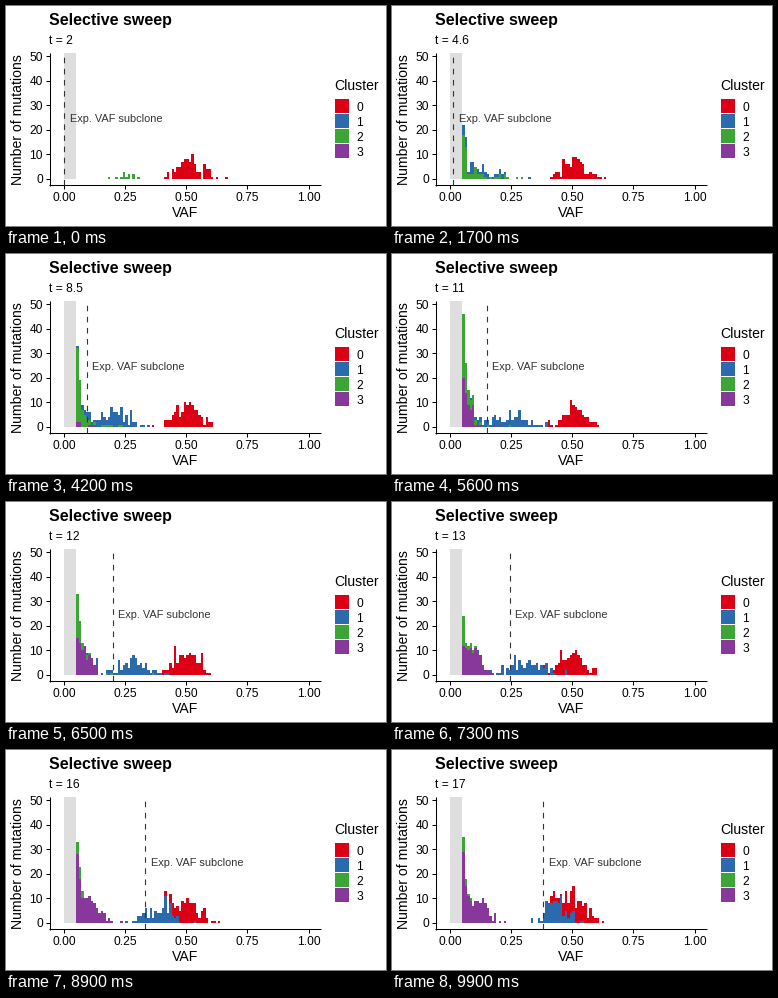
A matplotlib script that plays this animation: 380x220 px, repeating every 10 s.

```python
import numpy as np
import matplotlib.pyplot as plt
from matplotlib.animation import FuncAnimation
from matplotlib.patches import Rectangle

W, H, DPI = 380, 220, 100
FRAMES, INTERVAL = 100, 100
X0, X_UNIT = 58.0, 244.5      # VAF 0 and pixels per unit
Y0, Y_UNIT = 173.0, 2.455     # count 0 and pixels per mutation
LEFT, RIGHT, TOP, BOTTOM = 43.5, 315, 47, 179.5
COLORS = ["#dd0014", "#2b6bad", "#3da536", "#88379a"]
BINS = np.arange(5, 70)       # VAF in percent


def subclone_vaf(f):
    return np.interp(f, [12, 30, 56, 89, 99], [0, 4.5, 15, 33.2, 38])


def tail(height, decay):
    return height * np.exp(-(BINS - 5) / decay)


def hump(height, mid, width):
    return height * np.exp(-0.5 * ((BINS - mid) / width) ** 2)


def profiles(f):
    """Expected bar heights of the four clusters."""
    v = subclone_vaf(f)
    young = np.exp(-f / 6)
    grown = np.clip((f - 12) / 10, 0, 1)
    green = np.interp(f, [4, 30, 56, 73, 99], [0, 36, 27, 11, 6])
    purple = np.interp(f, [20, 42, 56, 73, 89], [0, 4, 18, 10, 25])
    late = f - 70
    return [
        hump(8.5, 50.5, 4.8),
        tail(6 * np.exp(-((f - 28) / 10) ** 2), 3)
        + hump(grown * (3 + 0.14 * v), 12 + 0.8 * v, 8.5 - 0.11 * v),
        tail(green, 1.8 - 0.01 * f)
        + hump(max(0, 1.8 - f / 40), 12 + 13 * young, 7 - 4 * young),
        tail(purple, 3.6 - 0.024 * f)
        + hump(np.clip((f - 50) / 2.6, 0, 9), 9 + 0.1 * late, 3 + 0.05 * late),
    ]


def stacked(f):
    rng = np.random.default_rng(700 + f)
    layers = [np.where(m < 7, rng.poisson(m),
                       np.rint(m + rng.normal(0, 1.2, m.size)))
              for m in profiles(f)]
    return np.cumsum(layers[::-1], axis=0)[::-1]


fig = plt.figure(figsize=(W / DPI, H / DPI), dpi=DPI, facecolor="white")
ax = fig.add_axes([0, 0, 1, 1])
ax.axis("off")


def label(x, y, s, px, **kw):
    kw = {"va": "baseline", "family": "Liberation Sans", "color": "black", **kw}
    return ax.text(x, y, s, fontsize=px * 72 / DPI, **kw)


def line(xs, ys, **kw):
    kw = {"color": "black", "lw": 0.75, "solid_capstyle": "butt", **kw}
    return ax.plot(xs, ys, **kw)[0]


def box(x, y, w, h, color):
    ax.add_patch(Rectangle((x, y), w, h, fc=color, lw=0, antialiased=False))


box(X0, TOP, 0.05 * X_UNIT, Y0 - TOP, "#dedede")

edges = X0 + np.append(BINS, BINS[-1] + 1) / 100 * X_UNIT
flat = np.full(BINS.size, Y0)
bars = [ax.stairs(flat, edges, baseline=flat, fill=True, color=c, lw=0,
                  antialiased=False, zorder=2) for c in COLORS]

line([LEFT, LEFT], [TOP, BOTTOM + 0.5], zorder=3)
line([LEFT - 0.5, RIGHT], [BOTTOM, BOTTOM], zorder=3)
for n in range(0, 51, 10):
    y = Y0 - n * Y_UNIT
    line([LEFT - 3.5, LEFT], [y, y])
    label(36.8, y + 4.3, str(n), 12, ha="right")
for v in np.linspace(0, 1, 5):
    x = X0 + v * X_UNIT
    line([x, x], [BOTTOM, BOTTOM + 3.5])
    label(x, 195, f"{v:.2f}", 12, ha="center")

label(43, 19, "Selective sweep", 16, weight="bold")
label(179, 211, "VAF", 14, ha="center")
label(12.5, 113.3, "Number of mutations", 14, ha="center", va="center",
      rotation=90)
label(328.6, 84, "Cluster", 14)
for i, c in enumerate(COLORS):
    box(329, 93 + 15 * i, 14, 14, c)
    label(350.5, 105 + 15 * i, str(i), 12)

clock = label(43, 38, "", 12)
marker = line([X0, X0], [BOTTOM, TOP], color="#333333", lw=0.8, zorder=4,
              dashes=(5, 5), dash_capstyle="butt")
note = label(X0, 116, "Exp. VAF subclone", 11, color="#333333", zorder=5)
ax.set(xlim=(0, W), ylim=(H, 0))


def draw(f):
    tops = Y0 - Y_UNIT * stacked(f)
    for bar, top, base in zip(bars, tops, [*tops[1:], flat]):
        bar.set_data(values=top, baseline=base)
    x = X0 + X_UNIT * subclone_vaf(f) / 100
    marker.set_xdata([x, x])
    note.set_x(x + 5.6)
    clock.set_text(f"t = {2 + 0.1555 * f:.2g}")
    return [*bars, marker, note, clock]


anim = FuncAnimation(fig, draw, frames=FRAMES, interval=INTERVAL,
                     repeat=True, repeat_delay=0)
plt.show()
```
